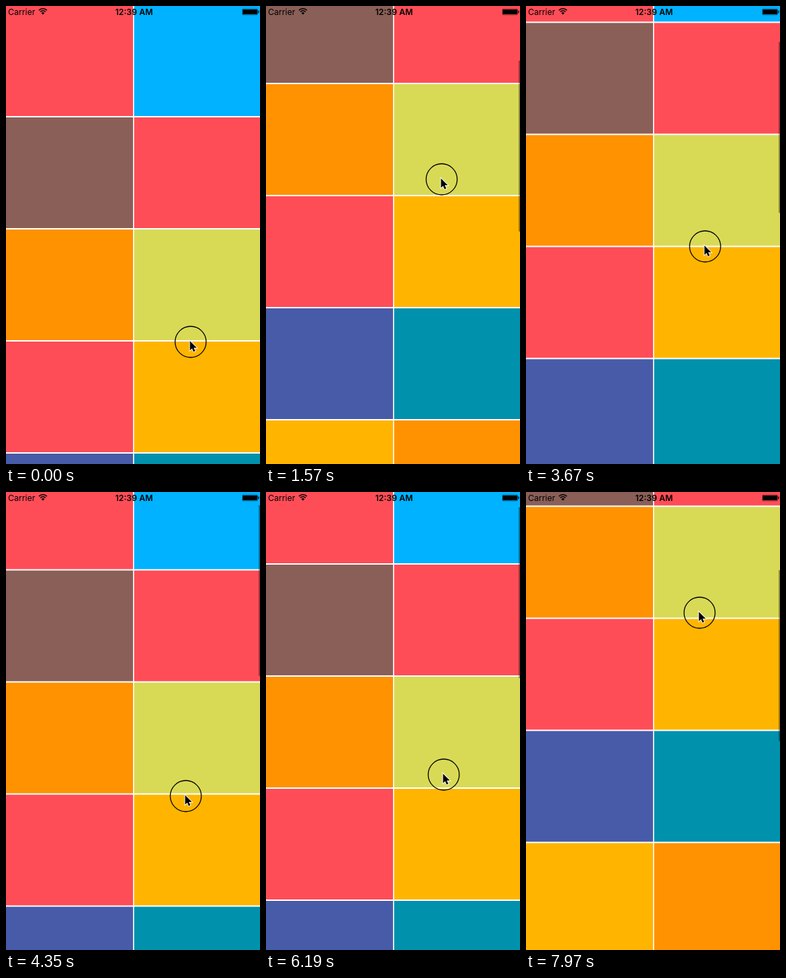
An HTML page with a canvas that plays this animation: 368x662 px, repeating every 7.99 s.

```html
<!DOCTYPE html>
<html lang="en">
<head>
<meta charset="utf-8">
<title>Scrolling colour grid</title>
<style>
  html, body { margin: 0; width: 100%; height: 100%; overflow: hidden; background: #fff; }
  canvas { position: absolute; left: 0; top: 0; display: block; }
  .label {
    position: absolute; top: 0; height: 17px; white-space: nowrap;
    font: 12px/17px Inter, "Liberation Sans", sans-serif; color: #000;
  }
  #carrier { left: 3px; }
  #clock { left: 185.5px; transform: translateX(-50%); font-weight: 600; }
</style>
</head>
<body>
<canvas id="stage" width="368" height="662"></canvas>
<div class="label" id="carrier">Carrier</div>
<div class="label" id="clock">12:39 AM</div>
<script>
const W = 368, H = 662, LOOP = 7990;
const ctx = document.getElementById('stage').getContext('2d');

const RED = '#ff4d57', BLUE = '#00b2ff', PLUM = '#8a5f57', ORANGE = '#ff9200';
const LIME = '#d8da56', AMBER = '#ffb500', INDIGO = '#485ba8', TEAL = '#0091ad';
const ROWS = [
  [RED, BLUE], [PLUM, RED], [ORANGE, LIME],
  [RED, AMBER], [INDIGO, TEAL], [AMBER, ORANGE]
];
const TILE = 160, PITCH = 162, COL_END = 184, COL_START = 185.6;

// Key poses of the drag; the scroll trails the pointer slightly.
const POSES = [
  { n: 0, x: 267, y: 485, scroll: 1 },
  { n: 22, x: 260, y: 378, scroll: 91 },
  { n: 34, x: 254, y: 250, scroll: 211 },
  { n: 55, x: 248, y: 213, scroll: 262.5 },
  { n: 66, x: 250, y: 236, scroll: 250 },
  { n: 79, x: 259, y: 347, scroll: 137.5 },
  { n: 110, x: 261, y: 500, scroll: -12 },
  { n: 124, x: 260, y: 494, scroll: -14 },
  { n: 146, x: 252, y: 228, scroll: 227 },
  { n: 158, x: 251, y: 178, scroll: 300 },
  { n: 170, x: 251, y: 174, scroll: 302.5 }
];

// Monotone cubic curve through one property of the poses, at rest at both ends.
function curve(key) {
  const slopes = POSES.slice(1).map((p, i) => (p[key] - POSES[i][key]) / (p.n - POSES[i].n));
  const tangents = POSES.map((_, i) => {
    const a = slopes[i - 1], b = slopes[i];
    return a * b > 0 ? 2 * a * b / (a + b) : 0;
  });
  return n => {
    let i = 0;
    while (i < POSES.length - 2 && n >= POSES[i + 1].n) i++;
    const a = POSES[i], b = POSES[i + 1], span = b.n - a.n;
    const u = (n - a.n) / span, v = 1 - u;
    return a[key] * (1 + 2 * u) * v * v + tangents[i] * span * u * v * v
      + b[key] * u * u * (3 - 2 * u) - tangents[i + 1] * span * u * u * v;
  };
}
const pointerX = curve('x'), pointerY = curve('y'), scrollAt = curve('scroll');

// Three steps every 140 ms: one long, two short.
function stepAt(t) {
  if (t < 30) return 0;
  const u = t - 30, r = u % 140;
  return 1 + 3 * Math.floor(u / 140) + (r < 100 ? 0 : r < 120 ? 1 : 2);
}

function drawGrid(scroll) {
  ctx.fillStyle = '#fff';
  ctx.fillRect(0, 0, W, H);
  ROWS.forEach(([left, right], i) => {
    const y = i * PITCH - scroll;
    ctx.fillStyle = left;
    ctx.fillRect(0, y, COL_END, TILE);
    ctx.fillStyle = right;
    ctx.fillRect(COL_START, y, W - COL_START, TILE);
  });
}

function drawIndicator(scroll) {
  const top = Math.round(1.4 + 0.3697 * Math.max(0, scroll));
  ctx.fillStyle = 'rgba(0,0,0,.35)';
  ctx.fillRect(W - 2, top, 2, 247 + Math.min(0, scroll));
}

function drawStatus() {
  ctx.strokeStyle = ctx.fillStyle = '#000';
  ctx.lineWidth = 1.6;
  for (const r of [8.2, 5.2]) {
    ctx.beginPath();
    ctx.arc(53.5, 12, r, -Math.PI * 0.75, -Math.PI * 0.25);
    ctx.stroke();
  }
  ctx.beginPath();
  ctx.moveTo(53.5, 12.4);
  ctx.arc(53.5, 12.4, 3.2, -Math.PI * 0.75, -Math.PI * 0.25);
  ctx.fill();

  ctx.fillRect(343, 5, 21, 7);
  ctx.fillRect(365.2, 6.6, 1.3, 3.6);
  ctx.strokeStyle = 'rgba(0,0,0,.4)';
  ctx.lineWidth = 1;
  ctx.beginPath();
  ctx.roundRect(342.5, 4, 22, 9, 1.5);
  ctx.stroke();
}

function drawPointer(x, y) {
  ctx.strokeStyle = '#000';
  ctx.lineWidth = 1.3;
  ctx.beginPath();
  ctx.arc(x, y, 22.5, 0, Math.PI * 2);
  ctx.stroke();

  const arrow = new Path2D('M0 0V13.6L3.1 10.7L5.2 15.5L7.6 14.5L5.5 9.8H9.8Z');
  ctx.save();
  ctx.translate(x - 1, y - 1.3);
  ctx.strokeStyle = '#fff';
  ctx.lineWidth = 1.8;
  ctx.stroke(arrow);
  ctx.fillStyle = '#000';
  ctx.fill(arrow);
  ctx.restore();
}

function draw(now) {
  const n = stepAt(now % LOOP);
  const scroll = Math.round(scrollAt(n) * 2) / 2;
  drawGrid(scroll);
  if (n > 0) drawIndicator(scroll);
  drawStatus();
  drawPointer(Math.round(pointerX(n)) + 0.5, Math.round(pointerY(n)) + 0.5);
}

const start = performance.now();
function tick() {
  draw(performance.now() - start);
  requestAnimationFrame(tick);
}
tick();
</script>
</body>
</html>
```
